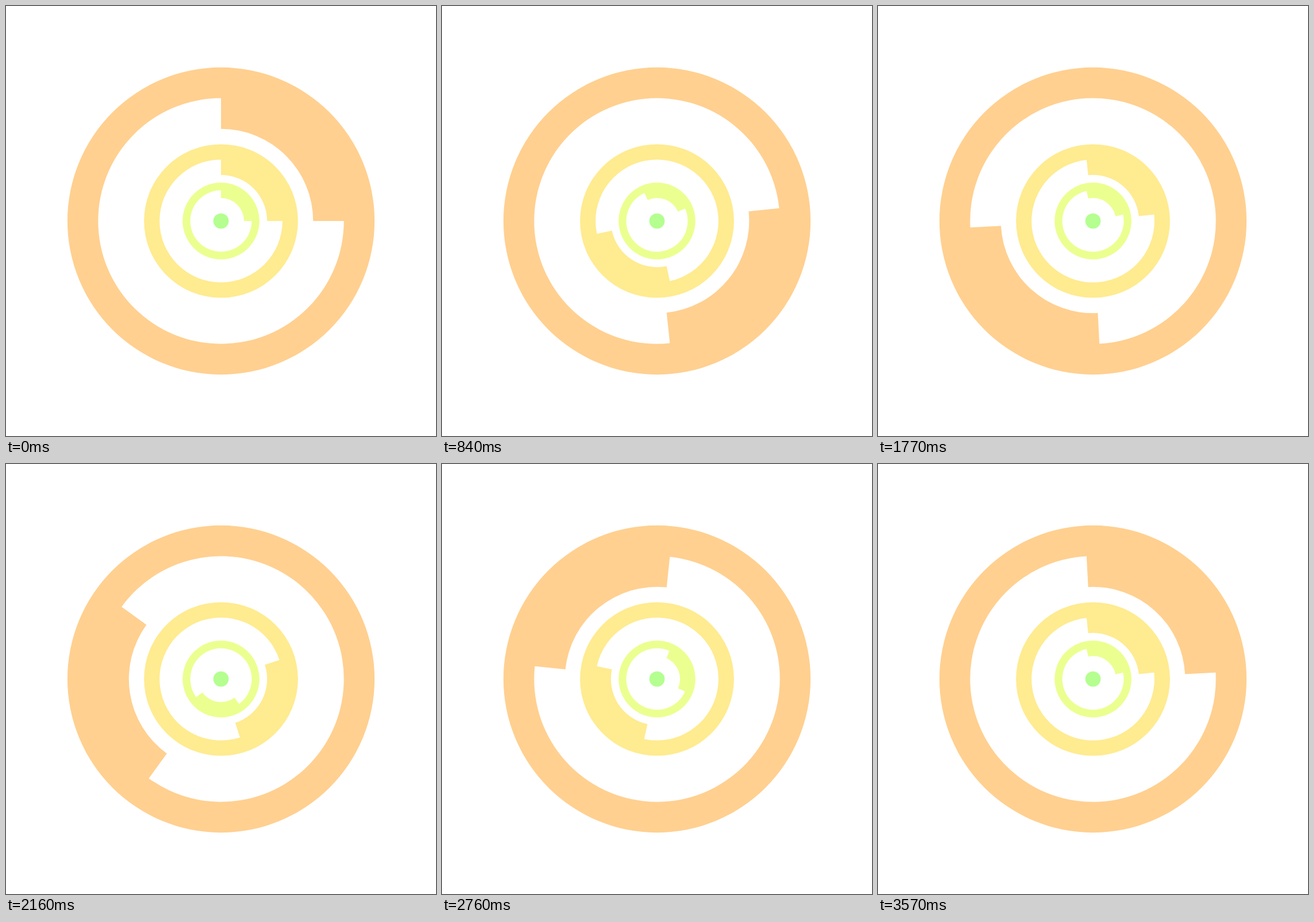
Write an HTML page that moves like this. It is 748 px wide and 748 px high and loops after 3.6 s.

```html
<!DOCTYPE html>
<html lang="en">
<head>
<meta charset="utf-8">
<title>Turning rings</title>
<style>
  html, body { margin: 0; width: 100%; height: 100%; overflow: hidden; background: #fff; }
  svg { display: block; width: 748px; height: 748px; }
</style>
</head>
<body>
<svg id="stage" viewBox="0 0 748 748"></svg>
<script>
const LOOP = 3600, STEP = 30;
const C = 374, UNIT = 748 / 14;
const stage = document.getElementById('stage');

// size in units, whole turns per loop, colour
const rings = [
  { size: 1,    turns: 1, color: '#ffd090' },
  { size: 0.5,  turns: 2, color: '#ffeb90' },
  { size: 0.25, turns: 4, color: '#ebff90' }
];

function add(tag, attrs) {
  const el = document.createElementNS('http://www.w3.org/2000/svg', tag);
  for (const k in attrs) el.setAttribute(k, attrs[k]);
  stage.appendChild(el);
  return el;
}

// Point at radius r, angle in degrees clockwise from the top
function point(r, deg) {
  const a = deg * Math.PI / 180;
  return (C + r * Math.sin(a)).toFixed(3) + ' ' + (C - r * Math.cos(a)).toFixed(3);
}

// Ring whose inner edge steps inwards over a quarter turn
function ringPath(size, deg) {
  const u = UNIT * size, outer = 5 * u, mid = 4 * u, inner = 3 * u;
  const end = deg + 90;
  return `M${point(outer, 0)}A${outer} ${outer} 0 1 1 ${point(outer, 180)}` +
    `A${outer} ${outer} 0 1 1 ${point(outer, 0)}Z` +
    `M${point(inner, deg)}A${inner} ${inner} 0 0 1 ${point(inner, end)}` +
    `L${point(mid, end)}A${mid} ${mid} 0 1 1 ${point(mid, deg)}Z`;
}

for (const ring of rings) {
  ring.el = add('path', { fill: ring.color, 'fill-rule': 'evenodd' });
}
add('circle', { cx: C, cy: C, r: UNIT / 4, fill: '#b4ff90' });

function draw(ms) {
  const t = Math.floor((ms % LOOP + 0.5) / STEP) * STEP / LOOP;
  for (const ring of rings) {
    ring.el.setAttribute('d', ringPath(ring.size, 360 * ring.turns * t));
  }
}

let start = null;
function tick(now) {
  if (start === null) start = now;
  draw(now - start);
  requestAnimationFrame(tick);
}
draw(0);
requestAnimationFrame(tick);
</script>
</body>
</html>
```
